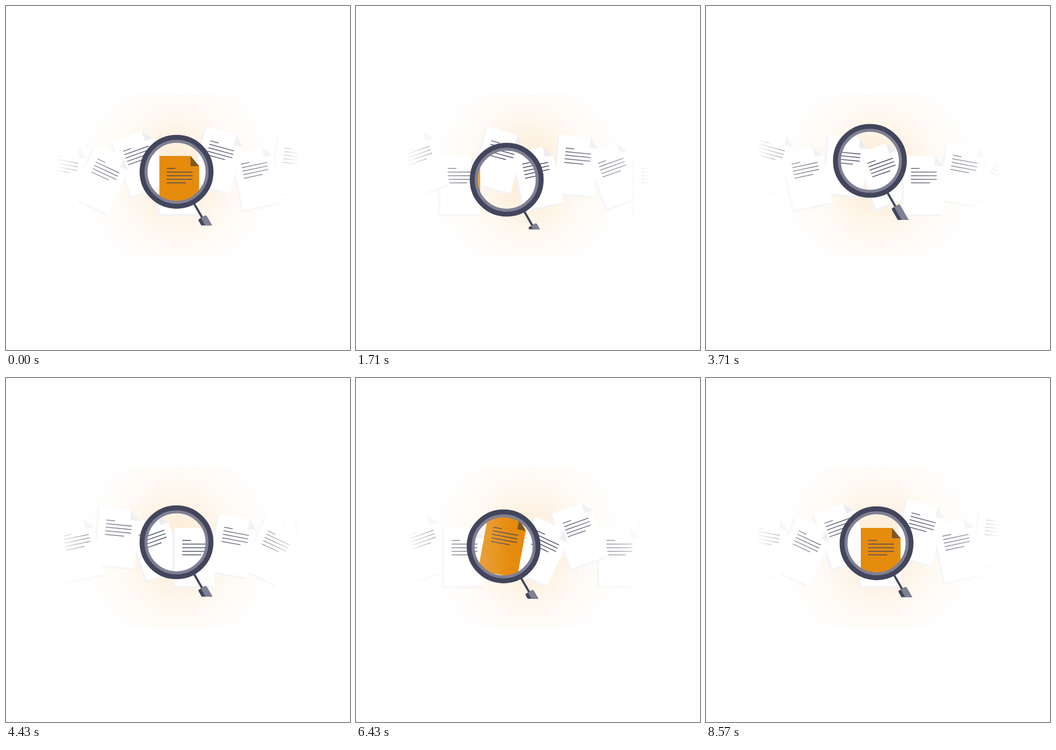
Write an HTML page with a canvas that moves like this. It is 640 by 640 pixels and loops after 8.64 s.

```html
<!DOCTYPE html>
<html lang="en">
<head>
<meta charset="utf-8">
<title>Document search</title>
<style>
  html, body { margin: 0; width: 100%; height: 100%; overflow: hidden; background: #fff; }
  canvas { display: block; width: 640px; height: 640px; }
</style>
</head>
<body>
<canvas id="stage" width="640" height="640"></canvas>
<script>
const ctx = document.getElementById('stage').getContext('2d');
const LOOP = 8640, FPS = 14, LAST_STEP = 120, RAD = Math.PI / 180;
const DARK = '#43455c', GREY = '#7f8094', INK = '#494b61';

// One strip of evenly spaced pages; the strip repeats to the right.
const PAGE_GAP = 72.1, FIRST_X = 34;
const STRIP = [
  { tilt: 0, y: 333 },
  { tilt: 10.5, y: 312, match: true },
  { tilt: 25, y: 322 },
  { tilt: -19.5, y: 291.5 },
  { tilt: 0, y: 333, match: true },
  { tilt: 15, y: 286.4 },
  { tilt: -12, y: 319.5 },
  { tilt: 5.5, y: 297 },
  { tilt: -19.5, y: 314 }
];
const LINE_LENGTHS = [15.5, 47.5, 47.5, 47.5, 35], LINE_GAP = 6.7;

function polygon(color, ...points) {
  ctx.fillStyle = color;
  ctx.beginPath();
  points.forEach(([x, y]) => ctx.lineTo(x, y));
  ctx.fill();
}

function drawSheet(color, dx = 0, dy = 0) {
  polygon(color, ...[[-37, -54], [21, -54], [37, -35], [37, 54], [-37, 54]]
    .map(([x, y]) => [x + dx, y + dy]));
}

function drawPage(x, { y, tilt }, highlighted) {
  ctx.save();
  ctx.translate(x, y);
  ctx.rotate(tilt * RAD);
  if (!highlighted) drawSheet('#f3f3f5', -4, 4);
  drawSheet(highlighted ? '#e58b0d' : '#fff');
  polygon(highlighted ? '#7c5721' : '#ededf0', [21, -54], [37, -35], [21, -35]);
  ctx.strokeStyle = INK;
  ctx.lineWidth = 1.5;
  ctx.lineCap = 'round';
  ctx.beginPath();
  LINE_LENGTHS.forEach((length, i) => {
    const lineY = i * LINE_GAP - 30.7;
    ctx.moveTo(-22.7, lineY);
    ctx.lineTo(length - 23.3, lineY);
  });
  ctx.stroke();
  ctx.restore();
}

// Within a strip the left pages lie on top; the next strip lies on the one before.
function drawPages(scroll, highlighted) {
  for (let copy = 0; copy < 2; copy++) {
    for (let i = STRIP.length - 1; i >= 0; i--) {
      const x = FIRST_X + (copy * STRIP.length + i) * PAGE_GAP - scroll;
      if (!highlighted || STRIP[i].match) drawPage(x, STRIP[i], highlighted);
    }
  }
}

const glow = ctx.createRadialGradient(320, 314, 0, 320, 314, 190);
glow.addColorStop(0, 'rgba(245,160,45,.24)');
glow.addColorStop(.55, 'rgba(245,160,45,.08)');
glow.addColorStop(1, 'rgba(245,160,45,0)');

const sideFade = ctx.createLinearGradient(0, 0, 640, 0);
for (const [x, alpha] of [[92, 1], [150, .48], [230, .19], [290, 0]]) {
  sideFade.addColorStop(x / 640, `rgba(255,255,255,${alpha})`);
  sideFade.addColorStop(1 - x / 640, `rgba(255,255,255,${alpha})`);
}

function ring(color, inner, outer) {
  ctx.strokeStyle = color;
  ctx.lineWidth = outer - inner;
  ctx.beginPath();
  ctx.arc(0, 0, (inner + outer) / 2, 0, 7);
  ctx.stroke();
}

function drawLens(x, y) {
  ctx.save();
  // The grip is cut off by an edge that follows the lens at half its speed.
  ctx.beginPath();
  ctx.rect(0, 0, 640, 408 + (y - 308) / 2);
  ctx.clip();
  ctx.translate(x, y);
  ring(GREY, 54, 60);
  ring(DARK, 59.5, 68.7);
  ctx.rotate(60 * RAD);
  ctx.translate(0, 1.3);
  ctx.fillStyle = DARK;
  ctx.fillRect(67, -2, 32, 4);
  ctx.beginPath();
  ctx.roundRect(97, -8.7, 60, 17.4, 3);
  ctx.fill();
  ctx.clip();
  ctx.fillStyle = GREY;
  ctx.fillRect(97, -8.7, 60, 11.2);
  ctx.restore();
}

function draw(time) {
  const step = Math.min(LAST_STEP, Math.floor((time % LOOP + 5) * FPS / 1000));
  // Steady travel with a slight surge just before the loop closes.
  const travel = step + .8 * (step / LAST_STEP) ** 8;
  const scroll = 5.35 * travel;
  const angle = (2 + 5.42 * travel + .0043 * travel ** 2) * RAD;
  const lensX = 295.6 + 21.7 * Math.cos(angle);
  const lensY = 307.7 + 21.7 * Math.sin(angle);

  ctx.fillStyle = '#fff';
  ctx.fillRect(0, 0, 640, 640);
  ctx.fillStyle = glow;
  ctx.fillRect(0, 164, 640, 300);

  drawPages(scroll, false);
  ctx.save();
  ctx.beginPath();
  ctx.arc(lensX, lensY, 57, 0, 7);
  ctx.clip();
  drawPages(scroll, true);
  ctx.restore();

  ctx.fillStyle = sideFade;
  ctx.fillRect(0, 164, 640, 300);
  drawLens(lensX, lensY);
}

const start = performance.now();
function tick() {
  draw(performance.now() - start);
  requestAnimationFrame(tick);
}
tick();
</script>
</body>
</html>
```
